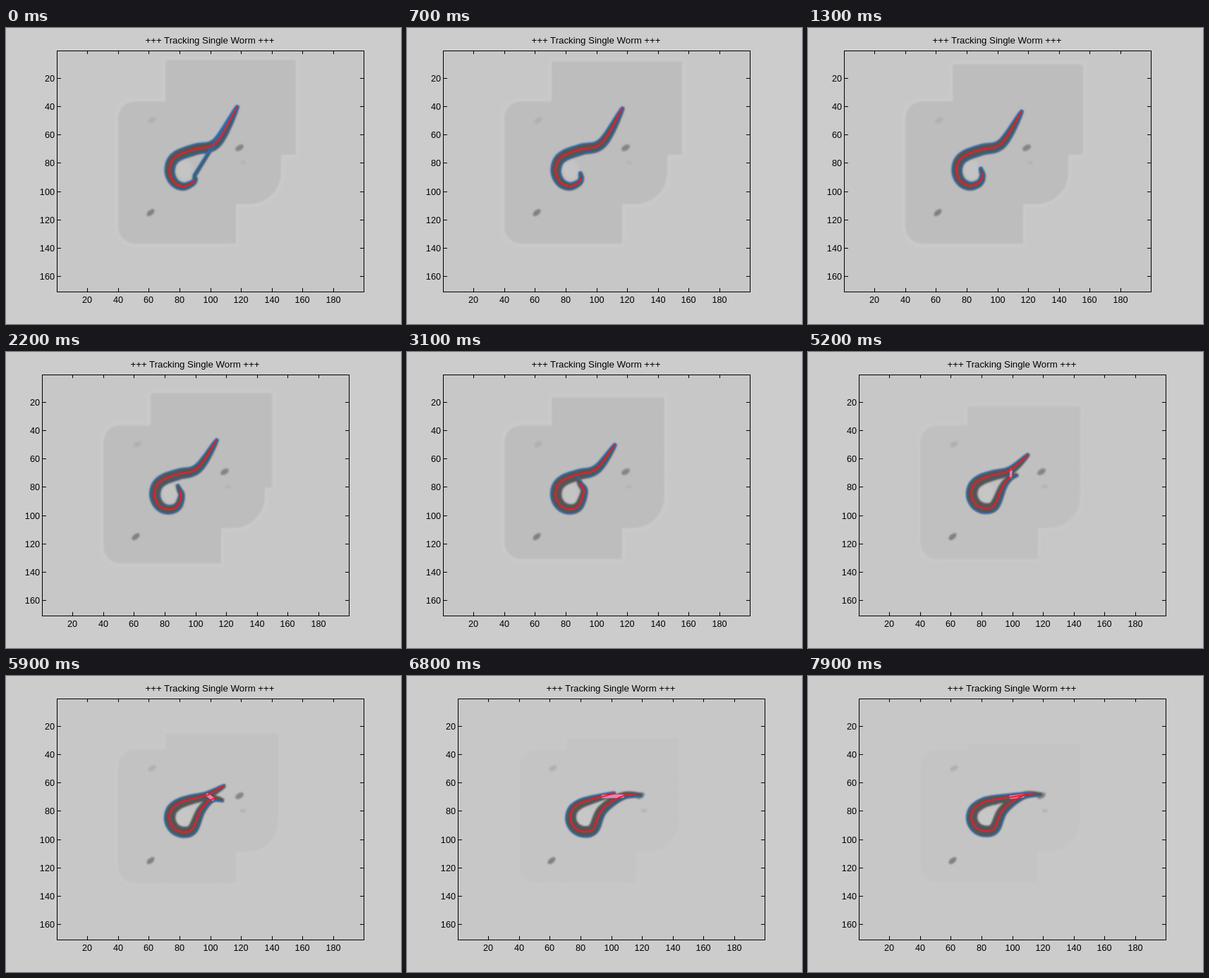
Write an HTML page that moves like this. It is 560x420 px and loops after 8 s.

```html
<!DOCTYPE html>
<html lang="en">
<head>
<meta charset="utf-8">
<title>Tracking Single Worm</title>
<style>
  html, body { margin: 0; width: 100%; height: 100%; overflow: hidden; background: #ccc; }
  svg { display: block; width: 560px; height: 420px; }
  text { font: 12.7px "Liberation Sans", Arial, sans-serif; fill: #000; }
  .title { font-size: 13.25px; }
  .line { fill: none; stroke-linejoin: round; stroke-linecap: round; }
  .blue { stroke: #1478dc; stroke-width: 1.2; }
</style>
</head>
<body>
<svg viewBox="0 0 560 420">
  <defs>
    <filter id="soft" x="-20%" y="-20%" width="140%" height="140%"><feGaussianBlur stdDeviation="1.2"/></filter>
    <filter id="halo" x="-20%" y="-20%" width="140%" height="140%"><feGaussianBlur stdDeviation="2.5"/></filter>
  </defs>
  <rect width="560" height="420" fill="#ccc"/>
  <g id="plot">
    <rect x="72" y="32" width="436" height="343" fill="#c7c7c7"/>
    <g id="patch">
      <path id="patchRim" fill="none" stroke="#cacaca" stroke-width="9" filter="url(#halo)"/>
      <path id="patchFill" fill="#bdbdbd" filter="url(#soft)"/>
    </g>
    <g filter="url(#soft)">
      <ellipse rx="6.5" ry="3.8" fill="#858585" transform="translate(331 170) rotate(-30)"/>
      <ellipse rx="6.5" ry="3.5" fill="#808080" transform="translate(205 262) rotate(-40)"/>
      <ellipse rx="6" ry="3.5" fill="#b0b0b0" transform="translate(207 131) rotate(-30)"/>
      <ellipse rx="4" ry="2.5" fill="#b4b4b4" transform="translate(336 191)"/>
    </g>
    <ellipse cx="253" cy="201" rx="11" ry="14" fill="#cacaca" opacity=".6" filter="url(#halo)"/>
    <path id="body" fill="#545454" filter="url(#soft)"/>
    <path id="pink" class="line" stroke="#ec82b4"/>
    <path id="outer" class="line blue"/>
    <path id="innerHead" class="line blue"/>
    <path id="innerTail" class="line blue"/>
    <path id="track" class="line" stroke="#ff1428" stroke-width="2"/>
    <path id="ticks" fill="none" stroke="#000" shape-rendering="crispEdges"/>
    <g id="labels"></g>
  </g>
</svg>
<script>
const $ = id => document.getElementById(id);
const set = (id, attrs) => { for (const k in attrs) $(id).setAttribute(k, attrs[k]); };
const clamp = v => Math.max(0, Math.min(1, v));
const ramp = (v, from, to) => clamp((v - from) / (to - from));
const lerp = (a, b, k) => Array.isArray(a) ? a.map((v, i) => lerp(v, b[i], k)) : a + (b - a) * k;
const toPath = points => "M" + points.map(p => p.map(v => v.toFixed(1)).join(" ")).join("L");

const LAST_STEP = 71;

// Where the two ends of the worm are
const ends = [
  { at: 0, head: [329, 110], tail: [267, 207] },
  { at: 27, head: [317, 130], tail: [262, 178] },
  { at: 39, head: [315, 137], tail: [290, 172] },
  { at: 51, head: [311, 155], tail: [309, 177] },
  { at: 60, head: [296, 166], tail: [334, 169] },
  { at: LAST_STEP, head: [317, 167], tail: [332, 168] }
];

function endsAt(step) {
  const next = Math.max(1, ends.findIndex(key => key.at >= step));
  const a = ends[next - 1], b = ends[next], k = ramp(step, a.at, b.at);
  return { head: lerp(a.head, b.head, k), tail: lerp(a.tail, b.tail, k) };
}

// Head and neck, an elliptic loop, then the tail bending around an elbow
function wormAt(step) {
  const { head, tail } = endsAt(step), p = step / LAST_STEP;
  const collar = lerp([269, 172], [258, 177], p);
  const neck = lerp(collar, head, .5);
  neck[1] += Math.max(0, .4 * (164 - head[1]));
  const loop = [];
  for (let deg = 110; deg <= 310; deg += 40) {
    const a = -deg * Math.PI / 180;
    loop.push([252 + 20 * Math.cos(a), lerp(202, 200.5, p) + lerp(23, 20, p) * Math.sin(a)]);
  }
  const unfold = ramp(step, 0, 39);
  const bend = [268 + 9 * unfold ** 2, lerp(215, 190, unfold)];
  const elbow = lerp(bend, tail, .5);
  elbow[1] -= 9 * ramp(step, 39, 51);
  return { neck, elbow, spine: [head, neck, collar, ...loop, bend, elbow, tail] };
}

// Catmull-Rom curve through the points
function smooth(points, parts = 8) {
  const last = points.length - 1, out = [];
  for (let s = 0; s <= last * parts; s++) {
    const i = Math.min(Math.floor(s / parts), last - 1), t = s / parts - i;
    const [a, b, c, d] = [i - 1, i, i + 1, i + 2].map(j => points[Math.max(0, Math.min(last, j))]);
    out.push([0, 1].map(n => b[n] + .5 * t * (c[n] - a[n]
      + t * (2 * a[n] - 5 * b[n] + 4 * c[n] - d[n] + t * (3 * (b[n] - c[n]) + d[n] - a[n])))));
  }
  return out;
}

// The same curve with points at equal distances
function even(curve, count = 80) {
  const run = [0];
  for (let i = 1; i < curve.length; i++)
    run.push(run[i - 1] + Math.hypot(curve[i][0] - curve[i - 1][0], curve[i][1] - curve[i - 1][1]));
  return Array.from({ length: count + 1 }, (_, n) => {
    const want = run[run.length - 1] * n / count;
    const i = Math.max(1, run.findIndex(r => r >= want));
    return lerp(curve[i - 1], curve[i], ramp(want, run[i - 1], run[i]));
  });
}

function offset(curve, side, extra = 0) {
  const last = curve.length - 1;
  return curve.map(([x, y], i) => {
    const p = curve[Math.max(0, i - 1)], q = curve[Math.min(last, i + 1)];
    const dx = q[0] - p[0], dy = q[1] - p[1], len = Math.hypot(dx, dy) || 1;
    const half = side * (extra + 1 + 6 * Math.max(0, Math.sin(Math.PI * i / last)) ** .6);
    return [x - half * dy / len, y + half * dx / len];
  });
}

function roundBox(left, top, right, bottom, r) {
  const corner = (x, y) => `a${r} ${r} 0 0 1 ${x * r} ${y * r}`;
  return `M${left + r} ${top}H${right - r}${corner(1, 1)}V${bottom - r}${corner(-1, 1)}`
    + `H${left + r}${corner(-1, -1)}V${top + r}${corner(1, -1)}Z`;
}

function patchAt(step) {
  const settle = ramp(step, 9, 27), right = lerp(411, 386, settle);
  return roundBox(159, 104, 326, lerp(306, 294, settle), 24)
    + roundBox(226, lerp(45, 96, step / LAST_STEP), right, lerp(180, 205, settle), 3)
    + roundBox(226, 130, lerp(390, 386, settle), 250, 45)
    + roundBox(226, 180, 326, lerp(306, 294, settle), 3);
}

function buildAxes() {
  let ticks = "M72.5 32.5H507.5V374.5H72.5Z";
  let labels = '<text class="title" x="289" y="22" text-anchor="middle">+++ Tracking Single Worm +++</text>';
  for (let v = 20; v <= 180; v += 20) {
    const x = Math.round(71.6 + 2.18 * v), y = Math.round(30.6 + 2.01 * v);
    ticks += `M${x + .5} 374v-5M${x + .5} 33v4`;
    labels += `<text x="${x}" y="389.5" text-anchor="middle">${v}</text>`;
    if (v > 160) continue;
    ticks += `M73 ${y + .5}h5M507 ${y + .5}h-5`;
    labels += `<text x="69" y="${y + 5}" text-anchor="end">${v}</text>`;
  }
  set("ticks", { d: ticks });
  $("labels").innerHTML = labels;
}

// Still for 500 ms at the start and before the second axes jump
function stepAt(ms) {
  const tick = Math.floor(ms / 100);
  return tick < 5 ? 0 : tick < 49 ? Math.min(tick - 4, 40) : tick - 8;
}

function draw(ms) {
  const step = stepAt(ms);
  set("plot", { transform: `translate(${step > 0 && step < 41 ? -21 : 0} 0)` });

  const patch = patchAt(step);
  set("patchFill", { d: patch });
  set("patchRim", { d: patch });
  set("patch", { opacity: 1 - .8 * ramp(step, 27, 62) });

  const { neck, elbow, spine } = wormAt(step);
  const curve = even(smooth(spine)), last = curve.length - 1;
  const outer = offset(curve, 1), inner = offset(curve, -1), split = Math.round(last * .3);
  set("body", { d: toPath([...offset(curve, 1, 1.2), ...offset(curve, -1, 1.2).reverse()]) + "Z" });
  set("outer", { d: toPath(outer) });
  set("innerHead", { d: toPath(inner.slice(0, split + 1)), opacity: 1 - ramp(step, 27, 51) });
  set("innerTail", { d: toPath(inner.slice(split)), opacity: 1 - ramp(step, 9, 27) });
  set("track", { d: toPath(curve.slice(1, -4)) });
  set("pink", { d: toPath([neck, elbow]), "stroke-width": 5 * ramp(step, 27, 51) });
}

buildAxes();
const start = performance.now();
function frame() {
  draw((performance.now() - start) % 8000);
  requestAnimationFrame(frame);
}
frame();
</script>
</body>
</html>
```
